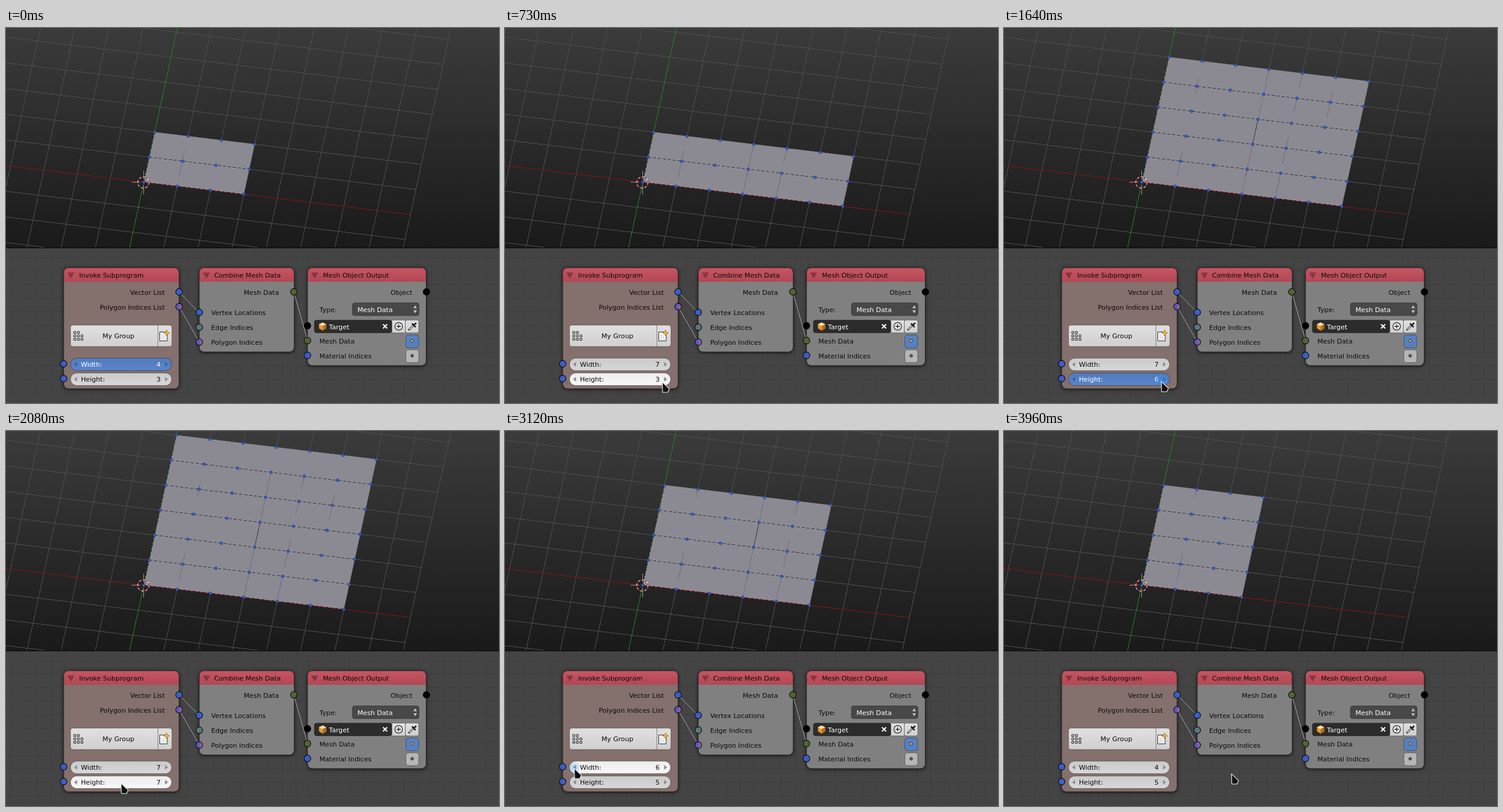
These frames come from a looping animation (829x631 px, 4.06 s). An HTML page:

```html
<!DOCTYPE html>
<html lang="en">
<head>
<meta charset="utf-8">
<title>Grid subprogram</title>
<style>
html, body { margin: 0; width: 100%; height: 100%; overflow: hidden; background: #444; }
svg { display: block; width: 829px; height: 631px; }
text { font: 11.1px "DejaVu Sans", sans-serif; fill: #0a0a0a; white-space: pre; }
.end { text-anchor: end; }
.mid { text-anchor: middle; }
.light { fill: #fff; }
.crisp { shape-rendering: crispEdges; }
.node { filter: drop-shadow(0 1px 3px rgba(0, 0, 0, .75)); }
</style>
</head>
<body>
<svg id="stage" viewBox="0 0 829 631">
  <defs>
    <linearGradient id="sky" x2="0" y2="1"><stop stop-color="#3b3b3b"/><stop offset="1" stop-color="#1a1a1a"/></linearGradient>
    <linearGradient id="head" x2="0" y2="1"><stop stop-color="#c65562"/><stop offset="1" stop-color="#b24854"/></linearGradient>
    <linearGradient id="btn" x2="0" y2="1"><stop stop-color="#e0e0e0"/><stop offset="1" stop-color="#d0d0d0"/></linearGradient>
    <linearGradient id="idle" x2="0" y2="1"><stop stop-color="#cacaca"/><stop offset="1" stop-color="#d8d8d8"/></linearGradient>
    <linearGradient id="hover" x2="0" y2="1"><stop stop-color="#ececec"/><stop offset="1" stop-color="#f8f8f8"/></linearGradient>
    <linearGradient id="press" x2="0" y2="1"><stop stop-color="#527bbf"/><stop offset="1" stop-color="#5b85c8"/></linearGradient>
    <linearGradient id="poly"><stop offset=".35" stop-color="#4d5cc4"/><stop offset=".75" stop-color="#a25a9c"/></linearGradient>
    <radialGradient id="glow"><stop offset=".5" stop-color="#2b95ee"/><stop offset="1" stop-color="#2b95ee" stop-opacity=".4"/></radialGradient>
    <clipPath id="view"><rect width="829" height="369"/></clipPath>
  </defs>
</svg>
<script>
const NS = 'http://www.w3.org/2000/svg';
const stage = document.getElementById('stage');
const LOOP = 4060;
const RIM = { stroke: '#000', 'stroke-opacity': .35 };

function add(parent, tag, attrs, content) {
  const el = document.createElementNS(NS, tag);
  for (const key in attrs) el.setAttribute(key, attrs[key]);
  if (content !== undefined) el.textContent = content;
  return parent.appendChild(el);
}
const rect = (p, x, y, width, height, fill, rx = 0, more = {}) =>
  add(p, 'rect', { x, y, width, height, fill, rx, ...more });
const path = (p, d, stroke, more = {}) => add(p, 'path', { d, stroke, fill: 'none', ...more });
const shape = (p, d, fill, more = {}) => add(p, 'path', { d, fill, ...more });
const label = (p, x, y, content, cls = '') => add(p, 'text', { x, y: y + 4, class: cls }, content);
const socket = (p, cx, cy, fill) =>
  add(p, 'circle', { cx, cy, r: 5.6, fill, stroke: '#0b0b0b', 'stroke-width': 1.1 });

// Viewport: one unit of the floor is one mesh cell
const at = (i, j) => [231.7 + 56.05 * i + 9.15 * j, 259.5 + 6.78 * i - 42.1 * j];
const spot = (i, j) => at(i, j).map(n => n.toFixed(1)).join(' ');
const seg = (i, j, k, l) => `M${spot(i, j)}L${spot(k, l)}`;

const view = add(stage, 'g', { 'clip-path': 'url(#view)' });
rect(view, 0, 0, 829, 369, 'url(#sky)');
let floor = '';
for (let n = -8; n <= 8; n++) if (n) floor += seg(n, -8, n, 8) + seg(-8, n, 8, n);
path(view, floor, '#4e4e4e', { class: 'crisp' });
path(view, seg(-8, 0, 8, 0), '#8c1217', { class: 'crisp' });
path(view, seg(0, -8, 0, 8), '#1d861f', { class: 'crisp' });

const face = shape(view, '', '#8b8a93');
const redEdge = path(view, '', '#a3161c', { class: 'crisp' });
const greenEdge = path(view, '', '#3c7840', { class: 'crisp' });
const dashed = (color, dash) => path(view, '', color, { class: 'crisp', 'stroke-dasharray': dash });
const rows = dashed('#36363c', '5 3.33');
const rim = dashed('#2c2a2e', '3 5.33');
const dots = dashed('#3a3a40', '1 2');
const solid = path(view, '', '#3a3a40', { class: 'crisp' });
const verts = shape(view, '', '#3c60d2', { stroke: '#20357f', 'stroke-width': .8 });

path(view, 'M211 259.5H225M237 259.5H251M231.5 240V254M231.5 265V280', '#969696', { class: 'crisp' });
[['#fff', 0], ['#e01515', 4]].forEach(([stroke, offset]) =>
  add(view, 'circle', { cx: 231, cy: 260, r: 9.5, fill: 'none', stroke, pathLength: 64,
    'stroke-width': 1.1, 'stroke-dasharray': '4 4', 'stroke-dashoffset': offset }));

// Only parts of the column edges show through: column, from row, to row
const columnBits = [
  [1, .3, 1.4], [1, 3.66, 4.3], [3, 0, 2], [3, 3, 5], [4, .03, .9],
  [4, 1.4, 2.45], [4, 3.48, 4], [4, 4.4, 5], [5, 3.4, 4.4]
];

function drawMesh(w, h) {
  const r = w - 1, t = h - 1;
  face.setAttribute('d', `M${spot(0, 0)}L${spot(r, 0)}L${spot(r, t)}L${spot(0, t)}Z`);
  redEdge.setAttribute('d', seg(0, 0, r, 0));
  greenEdge.setAttribute('d', seg(0, 0, 0, t));
  rim.setAttribute('d', seg(0, 0, r, 0) + seg(0, 0, 0, t));
  let d = '';
  for (let j = 1; j < t; j++) d += seg(0, j, r, j);
  rows.setAttribute('d', d);
  dots.setAttribute('d', columnBits.filter(b => b[0] < r && b[1] < t)
    .map(([i, a, b]) => seg(i, Math.min(b, t), i, a)).join(''));
  solid.setAttribute('d', r > 3 && t >= 3 ? seg(3, 2, 3, 3) : '');
  d = '';
  for (let i = 0; i < w; i++) for (let j = 0; j < h; j++) {
    const [x, y] = at(i, j);
    d += `M${x - 2.3} ${y}a2.3 2.3 0 1 0 4.6 0a2.3 2.3 0 1 0 -4.6 0`;
  }
  verts.setAttribute('d', d);
}

// Node editor
rect(stage, 0, 369, 829, 262, '#444');
let mesh = '';
for (let x = 7; x < 829; x += 22.86) mesh += `M${x} 371V631`;
for (let y = 386; y < 631; y += 22.86) mesh += `M0 ${y}H829`;
path(stage, mesh, '#3e3e3e', { class: 'crisp' });
rect(stage, 0, 369, 829, 1.6, '#0c0c0c');

function node(x, width, bottom, fill, title, titleX) {
  const g = add(stage, 'g', {});
  const top = 403.5;
  rect(g, x, top, width, bottom - top, fill, 8, { class: 'node' });
  shape(g, `M${x} 427V${top + 8}a8 8 0 0 1 8 -8H${x + width - 8}a8 8 0 0 1 8 8V427Z`, 'url(#head)');
  rect(g, x, top, width, bottom - top, 'none', 8, { stroke: '#1c1c1c', 'stroke-opacity': .75 });
  shape(g, `M${x + 6} 411.5h12l-6 10.5z`, '#87363f');
  label(g, titleX, 416, title);
  return g;
}
const sub = node(97, 194, 607, '#84706c', 'Invoke Subprogram', 123);
const comb = node(325, 159.5, 545, '#808080', 'Combine Mesh Data', 350);
const out = node(507, 199.5, 568, '#808080', 'Mesh Object Output', 533);

const links = 'M291 444L325 479M291 469L325 528M484 444L507 526';
path(stage, links, '#222', { 'stroke-width': 2.4, 'stroke-opacity': .3 });
path(stage, links, '#b4b4b4');

label(sub, 267, 445, 'Vector List', 'end');
label(sub, 267, 470, 'Polygon Indices List', 'end');
rect(sub, 108.5, 500, 170.5, 36, 'url(#btn)', 4, RIM);
path(sub, 'M255.5 500V536', '#808080');
label(sub, 189, 518, 'My Group', 'mid');
for (let k = 0; k < 9; k++)
  if (k !== 2) rect(sub, 114 + k % 3 * 6, 510.5 + (k / 3 | 0) * 5.8, 3.4, 3.4, '#e4e4e4', 1, { stroke: '#2a2a2a', 'stroke-width': 1.1 });
shape(sub, 'M258.5 511.5H267L271 516V526.5H258.5Z', '#f4f4f4', { stroke: '#333' });
path(sub, 'M261 517H266M261 520H268M261 523H268', '#ccc');
shape(sub, 'M270 508l1.5 3.5 3.5 1.5 -3.5 1.5 -1.5 3.5 -1.5 -3.5 -3.5 -1.5 3.5 -1.5z', '#ffb52e', { stroke: '#8a5a10', 'stroke-width': .7 });

function field(y, name) {
  const g = add(sub, 'g', {});
  const box = rect(g, 108.5, y - 10.5, 170, 21, 'url(#idle)', 10.5, RIM);
  const arrows = shape(g, `M119.5 ${y - 4}v8l-5 -4zM267.5 ${y - 4}v8l5 -4z`, '#8b8b8b');
  const title = label(g, 126, y, name);
  const value = label(g, 260, y, '', 'end');
  return (number, state) => {
    box.setAttribute('fill', `url(#${state})`);
    arrows.setAttribute('fill', state === 'press' ? '#3c609c' : '#8b8b8b');
    value.textContent = number;
    for (const el of [title, value]) el.classList.toggle('light', state === 'press');
  };
}
const setWidth = field(566, 'Width:');
const setHeight = field(591, 'Height:');

label(comb, 459, 445, 'Mesh Data', 'end');
['Vertex Locations', 'Edge Indices', 'Polygon Indices'].forEach((s, k) => label(comb, 345, 479 + 25 * k, s));

label(out, 683, 445, 'Object', 'end');
label(out, 527, 474, 'Type:');
rect(out, 582.5, 462.5, 112, 21.5, '#484848', 4, RIM);
label(out, 591, 474, 'Mesh Data', 'light');
shape(out, 'M685 471.5h6l-3 -5zM685 475h6l-3 5z', '#c4c4c4');
rect(out, 518.5, 491.5, 130, 21.5, '#2c2c2c', 4, RIM);
shape(out, 'M526 498.5l6.5 -3 6 3v7l-6 4 -6.5 -4z', '#e39b3c', { stroke: '#5a3508', 'stroke-width': .8 });
shape(out, 'M526 498.5l6.5 -3 6 3 -6 3z', '#fbe0ad');
shape(out, 'M532.5 501.5l6 -3v7l-6 4z', '#b96f1c');
label(out, 543, 503, 'Target', 'light');
path(out, 'M634 498.5l7 7m0 -7l-7 7', '#fff', { 'stroke-width': 2 });
rect(out, 649, 491.5, 22.5, 21.5, 'url(#btn)', 0, RIM);
rect(out, 671.5, 491.5, 22.5, 21.5, 'url(#btn)', 3, RIM);
add(out, 'circle', { cx: 660.3, cy: 502, r: 6.3, fill: '#f4f4f4', stroke: '#222', 'stroke-width': 1.2 });
path(out, 'M656.5 502h7.6M660.3 498.2v7.6', '#222', { 'stroke-width': 1.3 });
path(out, 'M677 508.5l8 -8', '#222', { 'stroke-width': 3 });
path(out, 'M678 507.5l7 -7', '#f2f2f2', { 'stroke-width': 1.3 });
path(out, 'M683.5 498l4.5 4.5M686 500l3 -3', '#1c1c1c', { 'stroke-width': 2.6, 'stroke-linecap': 'round' });
label(out, 527, 527, 'Mesh Data');
label(out, 527, 552, 'Material Indices');
[[516.5, '#5680c2', '#f3c064'], [541.5, '#b6b6b6', '#666']].forEach(([y, fill, dot]) => {
  rect(out, 672.5, y, 21.5, 21.5, fill, 4, RIM);
  add(out, 'circle', { cx: 683, cy: y + 10, r: 2.3, fill: dot, stroke: '#222' });
});

const blue = '#3c5dc6', green = '#52652f', pink = 'url(#poly)';
[[291, 444, blue], [291, 469, pink], [97, 565, blue], [97, 590, blue],
 [325, 478.5, blue], [325, 503.5, '#58777b'], [325, 528.5, pink],
 [484, 444, green], [707, 444, '#000'], [507, 501, '#000'], [507, 526, green], [507, 551, blue]
].forEach(s => socket(stage, ...s));

const pointer = add(stage, 'g', {});
const glow = add(pointer, 'circle', { r: 9.5, fill: 'url(#glow)' });
shape(pointer, 'M.5 .8L12.5 12.3L9.8 18H1Z', '#111', { stroke: '#f4f4f4', 'stroke-width': 1.1, 'stroke-linejoin': 'round' });

// time, width, height, field under the pointer, pressed
const steps = [
  [0, 4, 3, 'w', 1], [60, 4, 3, 'w', 0], [150, 5, 3, 'w', 1], [230, 5, 3, 'w', 0],
  [300, 6, 3, 'w', 1], [380, 6, 3, 'w', 0], [450, 7, 3, 'w', 1], [530, 7, 3, 'w', 0],
  [640, 7, 3, 'h', 0], [1040, 7, 4, 'h', 1], [1180, 7, 4, 'h', 0], [1290, 7, 5, 'h', 1],
  [1410, 7, 5, 'h', 0], [1560, 7, 6, 'h', 1], [1700, 7, 6, 'h', 0], [1800, 7, 7, 'h', 1],
  [1910, 7, 7, 'h', 0], [2400, 7, 6, 'h', 1], [2510, 7, 6, 'h', 0], [2600, 7, 5, 'h', 1],
  [2690, 7, 5, 'h', 0], [2830, 7, 5, 'w', 0], [2970, 6, 5, 'w', 1], [3080, 6, 5, 'w', 0],
  [3300, 5, 5, 'w', 1], [3390, 5, 5, 'w', 0], [3480, 4, 5, 'w', 1], [3570, 4, 5, 'w', 0],
  [3660, 4, 5, '', 0]
];
// time, x, y of the pointer tip
const track = [
  [40, 264, 570], [570, 264, 570], [700, 264, 595], [1950, 264, 594], [2220, 118, 589],
  [2700, 118, 589], [2880, 116, 567], [3580, 116, 567], [3800, 354, 592], [3960, 382, 576], [LOOP, 382, 576]
];

function pointerAt(t) {
  const k = track.findIndex(p => p[0] > t);
  const [t0, x0, y0] = track[k - 1], [t1, x1, y1] = track[k];
  const u = (t - t0) / (t1 - t0);
  return [x0 + (x1 - x0) * u, y0 + (y1 - y0) * u];
}

let shown = -1;
function draw(t) {
  let k = steps.length - 1;
  while (steps[k][0] > t) k--;
  const [, w, h, over, down] = steps[k];
  if (k !== shown) {
    shown = k;
    const state = down ? 'press' : 'hover';
    drawMesh(w, h);
    setWidth(w, over === 'w' ? state : 'idle');
    setHeight(h, over === 'h' ? state : 'idle');
  }
  pointer.setAttribute('visibility', t < 40 ? 'hidden' : 'visible');
  if (t < 40) return;
  const [x, y] = pointerAt(t);
  pointer.setAttribute('transform', `translate(${Math.round(x)} ${Math.round(y)})`);
  let c = k;
  while (c > 0 && !steps[c][4]) c--;
  glow.setAttribute('opacity', Math.max(0, .65 - (t - steps[c][0]) / 400));
}

const start = performance.now();
function tick() {
  draw((performance.now() - start) % LOOP);
  requestAnimationFrame(tick);
}
tick();
</script>
</body>
</html>
```
